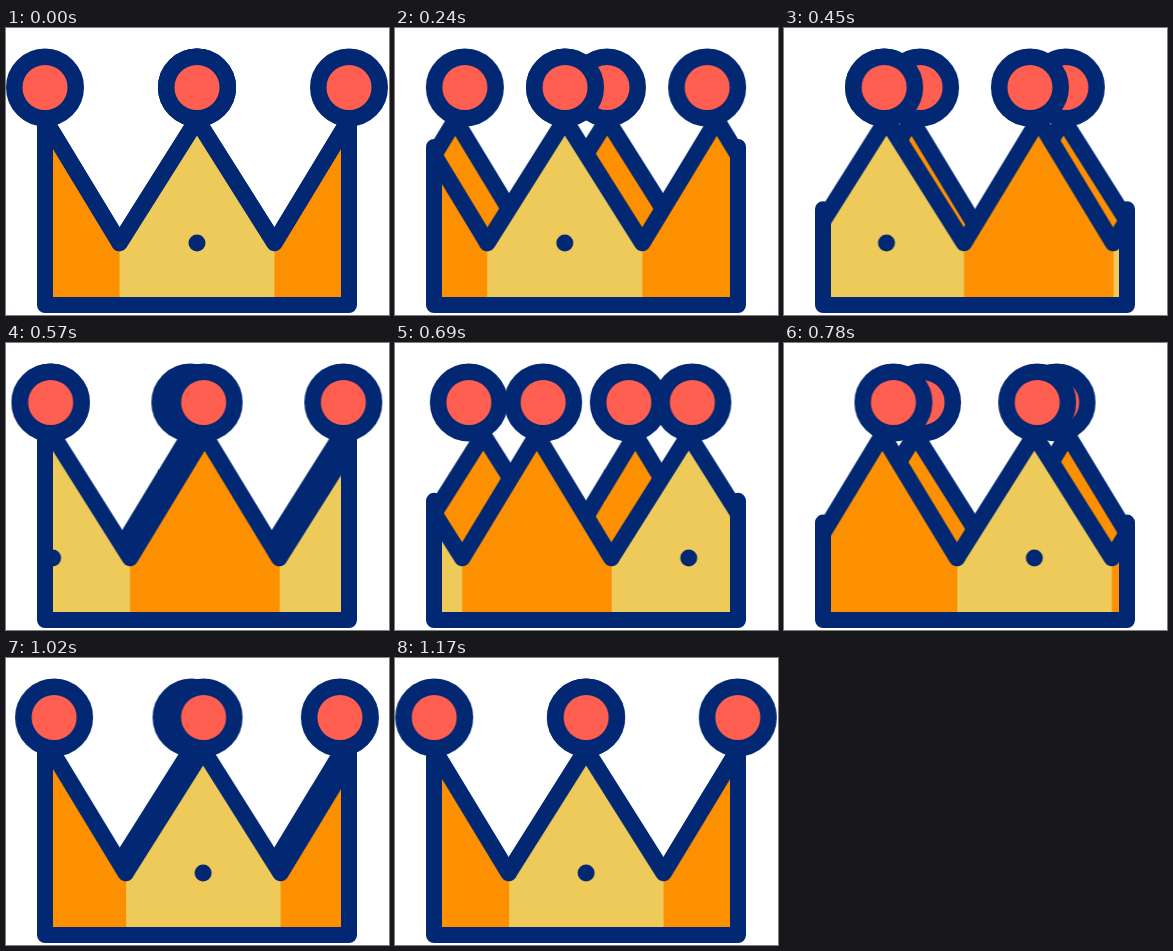
Recreate the animation shown at these times as an HTML page without scripts. Size 383 px wide and 287 px high, loop 1.2 s.

```html
<!DOCTYPE html>
<html lang="en">
<head>
<meta charset="utf-8">
<title>Spinning crown</title>
<style>
  :root { --navy: #022873; --red: #ff5f50; --yellow: #eeca5a; --orange: #fd9000; }
  html, body { margin: 0; width: 100%; height: 100%; overflow: hidden; background: #fff; }
  svg { display: block; width: 100%; height: 100%; }

  .zigzag, .frame { fill: none; stroke: var(--navy); stroke-width: 16.5; stroke-linejoin: round; stroke-linecap: round; }
  .frame { stroke-width: 16; }
  .orange { fill: var(--orange); }
  .yellow { fill: var(--yellow); }
  .dot { fill: var(--navy); }
  .ball { fill: var(--red); stroke: var(--navy); stroke-width: 16.5; }

  .front, .back, .frame, .ball, .cover { animation: 1.2s linear infinite; }
  .front { animation-name: front; }
  .back { animation-name: back; }
  .frame { animation-name: posts; }
  .near-left { animation-name: near-left; }
  .near-right { animation-name: near-right; }
  .far-left { animation-name: far-left; }
  .far-right { animation-name: far-right; }
  .cover { animation-name: cover; }

  @keyframes front {
    0% { transform: translateX(0); animation-timing-function: cubic-bezier(.48, 0, .7, .445); }
    48.9% { transform: translateX(-152px); animation-timing-function: cubic-bezier(.33, .57, .36, 1); }
    100% { transform: translateX(-304px); }
  }
  @keyframes back {
    0% { transform: translateX(-304px); animation-timing-function: cubic-bezier(.48, 0, .7, .445); }
    48.9% { transform: translateX(-152px); animation-timing-function: cubic-bezier(.33, .57, .36, 1); }
    100% { transform: translateX(0); }
  }
  /* side posts follow the height of the zigzag at the edges */
  @keyframes posts {
    0% { d: path("M39 85V277H343V85"); animation-timing-function: cubic-bezier(.5, 0, .75, .55); }
    35.5% { d: path("M39 199V277H343V199"); }
    48.9% { d: path("M39 85V277H343V85"); }
    62.5% { d: path("M39 199V277H343V199"); animation-timing-function: cubic-bezier(.2, .5, .4, 1); }
    100% { d: path("M39 85V277H343V85"); }
  }
  /* balls crossing the whole width */
  @keyframes near-right {
    0% { transform: translateX(343px); animation-timing-function: cubic-bezier(.37, 0, .73, .56); }
    48.9% { transform: translateX(191px); animation-timing-function: cubic-bezier(.33, .5, .45, 1); }
    100% { transform: translateX(39px); }
  }
  @keyframes far-left {
    0% { transform: translateX(39px); animation-timing-function: cubic-bezier(.37, 0, .73, .56); }
    48.9% { transform: translateX(191px); animation-timing-function: cubic-bezier(.33, .5, .45, 1); }
    100% { transform: translateX(343px); }
  }
  /* balls turning around at an edge */
  @keyframes near-left {
    0%, 100% { transform: translateX(191px); animation-timing-function: cubic-bezier(.57, 0, .75, .62); }
    48.75% { transform: translateX(39px); animation-timing-function: cubic-bezier(.33, .1, .05, 1); }
  }
  @keyframes far-right {
    0%, 100% { transform: translateX(191px); animation-timing-function: cubic-bezier(.57, 0, .75, .62); }
    48.75% { transform: translateX(343px); animation-timing-function: cubic-bezier(.33, .48, .33, 1); }
  }
  @keyframes cover {
    0% { opacity: 1; animation-timing-function: step-end; }
    48.75%, 100% { opacity: 0; }
  }
</style>
</head>
<body>
<svg viewBox="0 0 383 287" preserveAspectRatio="none">
  <defs>
    <clipPath id="inside"><rect x="39" width="304" height="287"/></clipPath>
    <path id="peaks" d="M113.5 215L191 92L268.5 215L343 92L417.5 215"/>
    <g id="panels">
      <path class="orange" d="M268 277V215L343 92L418 215V277Z"/>
      <path class="yellow" d="M113.5 277V215L191 92L268.5 215V277Z"/>
      <use href="#peaks" class="zigzag"/>
      <circle class="dot" cx="191" cy="215" r="8.5"/>
    </g>
    <g id="rear">
      <use href="#peaks" class="orange"/>
      <use href="#peaks" class="zigzag"/>
    </g>
    <circle id="ball" cy="59.5" r="30.75"/>
  </defs>

  <g clip-path="url(#inside)">
    <g class="back">
      <use href="#rear" x="-304"/>
      <use href="#rear"/>
      <use href="#rear" x="304"/>
    </g>
    <g class="front">
      <use href="#panels" x="-304"/>
      <use href="#panels" x="304"/>
      <use href="#panels"/>
    </g>
  </g>

  <path class="frame" d="M39 85V277H343V85"/>

  <use href="#ball" class="ball near-left"/>
  <use href="#ball" class="ball far-left"/>
  <use href="#ball" class="ball far-right"/>
  <!-- in front only until it turns at the left edge -->
  <g class="cover"><use href="#ball" class="ball near-left"/></g>
  <use href="#ball" class="ball near-right"/>
</svg>
</body>
</html>
```
